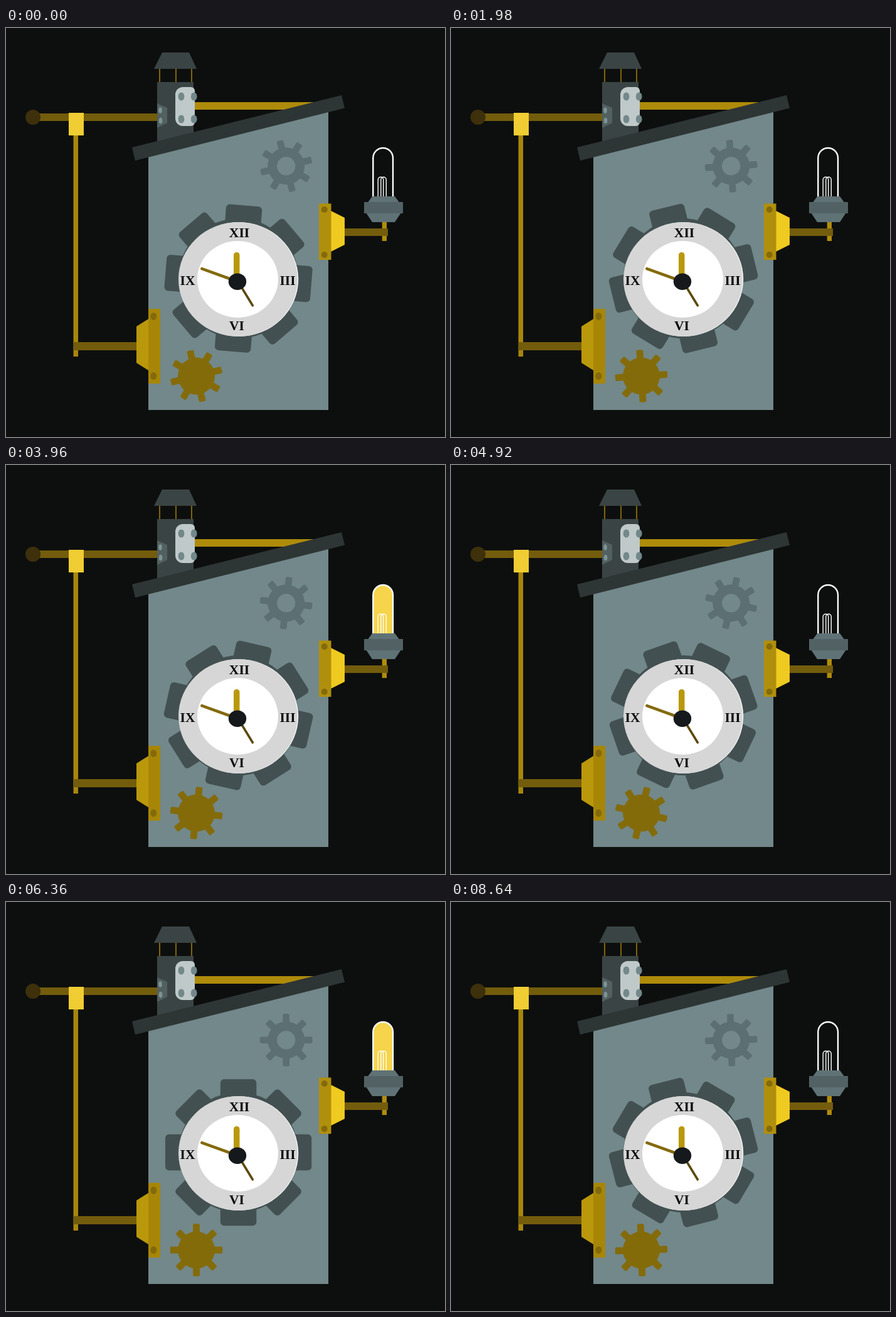
An HTML page with a canvas that plays this animation: 700 px wide and 651 px high, repeating every 8.7 s.

```html
<!DOCTYPE html>
<html lang="en">
<head>
<meta charset="utf-8">
<title>Clock machine</title>
<style>
html, body { margin: 0; width: 100%; height: 100%; overflow: hidden; background: #0d0f0f; }
canvas { display: block; }
</style>
</head>
<body>
<canvas id="stage" width="700" height="651"></canvas>
<script>
const ctx = document.getElementById('stage').getContext('2d');
const LOOP = 8700;
const WALL = '#72888a', GOLD = '#ae8b0a', BROWN = '#735c0c', BOLT = '#836a0c';

function rect(x1, y1, x2, y2, color) {
  ctx.fillStyle = color;
  ctx.fillRect(x1, y1, x2 - x1, y2 - y1);
}

function round(x, y, w, h, r, color) {
  ctx.fillStyle = color;
  ctx.beginPath();
  ctx.roundRect(x, y, w, h, r);
  ctx.fill();
}

function poly(color, ...p) {
  ctx.fillStyle = color;
  ctx.beginPath();
  for (let i = 0; i < p.length; i += 2) ctx.lineTo(p[i], p[i + 1]);
  ctx.fill();
}

function oval(x, y, rx, ry, color) {
  ctx.fillStyle = color;
  ctx.beginPath();
  ctx.ellipse(x, y, rx, ry, 0, 0, Math.PI * 2);
  ctx.fill();
}

function line(x1, y1, x2, y2, width, color) {
  ctx.strokeStyle = color;
  ctx.lineWidth = width;
  ctx.lineCap = 'round';
  ctx.beginPath();
  ctx.moveTo(x1, y1);
  ctx.lineTo(x2, y2);
  ctx.stroke();
}

function gear(x, y, deg, body, outer, tooth, corner, color) {
  ctx.save();
  ctx.translate(x, y);
  oval(0, 0, body, body, color);
  ctx.rotate(deg * Math.PI / 180);
  for (let i = 0; i < 8; i++) {
    round(-tooth / 2, -outer, tooth, outer * 0.6, corner, color);
    ctx.rotate(Math.PI / 4);
  }
  ctx.restore();
}

function arch(x1, x2, top, bottom) {
  const r = (x2 - x1) / 2;
  ctx.beginPath();
  ctx.moveTo(x1, bottom);
  ctx.arc(x1 + r, top + r, r, Math.PI, 0);
  ctx.lineTo(x2, bottom);
}

const ramp = (t, a, b) => Math.min(1, Math.max(0, (t - a) / (b - a)));

// Lamp brightness: flash, slow glow, flash
function glow(t) {
  const pulse = (a, b, fade) => Math.min(ramp(t, a, a + fade), 1 - ramp(t, b - fade, b));
  return Math.max(pulse(840, 1740, 60), pulse(3300, 4700, 600), pulse(6260, 7160, 60));
}

function tower() {
  rect(50, 136, 242, 148, BROWN);
  oval(43, 142, 12, 12, '#3d300a');
  rect(301, 118, 495, 130, GOLD);
  for (const x of [245, 271, 296]) rect(x - 1, 64, x + 1, 87, '#806508');
  poly('#3b4444', 249, 39, 292, 39, 304, 65, 236, 65);
  rect(241, 86, 299, 190, '#3b4444');
  poly('#526060', 241, 120, 257, 127, 257, 151, 241, 159);
  oval(246, 131, 2.8, 4.8, '#7b9496');
  oval(246.5, 147.5, 2.8, 4.8, '#7b9496');
  round(270, 94, 31, 62, [12, 6, 6, 12], '#bfc9c9');
  for (const x of [279.5, 299.7])
    for (const y of [109, 145]) oval(x, y, 4.9, 6.6, WALL);
}

function house() {
  poly(WALL, 227, 200, 514, 125, 514, 608, 227, 608);
  poly('#2e3535', 201, 190, 535, 107, 540, 127.5, 206, 211);
}

function leftPipes() {
  rect(107.5, 170, 115, 523, '#a8860c');
  rect(107.5, 500, 208, 513, BROWN);
  rect(100, 135, 124, 171, '#efcd33');
  poly('#ba980b', 208, 475, 228, 462.5, 228, 545.5, 208, 533);
  rect(227, 447, 246, 566, '#a78607');
  oval(235.3, 459, 5, 6, BOLT);
  oval(235.3, 554, 5, 6, BOLT);
}

function lamp(level) {
  poly('#efca20', 518, 291, 540, 302, 540, 345, 518, 356);
  rect(499, 279.5, 518.5, 369, '#b08f0d');
  oval(507.7, 289, 5, 5, BOLT);
  oval(507.7, 361, 5, 5, BOLT);
  rect(599.7, 308, 607, 339, '#b08c0c');
  rect(540, 319, 609, 331, BROWN);

  arch(585.3, 617, 191, 268);
  ctx.globalAlpha = level;
  ctx.fillStyle = '#f6d44c';
  ctx.fill();
  ctx.globalAlpha = 1;
  ctx.lineCap = 'butt';
  ctx.strokeStyle = '#fff';
  ctx.lineWidth = 2.4;
  ctx.stroke();
  ctx.lineWidth = 1.4;
  for (const x of [593.2, 597.8]) {
    arch(x, x + 8.5, 237.2, 268);
    ctx.stroke();
  }

  poly('#5f7275', 584, 268, 620, 268, 627, 277.5, 577, 277.5);
  poly('#5f7275', 574, 294, 630, 294, 620, 309, 584, 309);
  rect(571, 277, 633, 295, '#526264');
}

function dial() {
  oval(371.2, 400, 95, 91, '#fff');
  oval(370, 400, 95, 91, '#d6d6d6');
  oval(369.5, 400, 64.5, 61, '#fff');
  ctx.fillStyle = '#060808';
  ctx.font = 'bold 21.5px "Liberation Serif", "Times New Roman", serif';
  ctx.textAlign = 'center';
  ctx.fillText('XII', 372, 333);
  ctx.fillText('III', 449, 408.5);
  ctx.fillText('VI', 368, 481);
  ctx.fillText('IX', 289.5, 408.5);
  round(363, 357, 9.5, 46, 4.5, '#ba980b');
  line(312.3, 383.2, 369, 403.5, 4.6, BOLT);
  line(369, 402, 393.3, 441.8, 3.6, '#5b4909');
  oval(369, 403.7, 14.2, 13.3, '#16191c');
}

function draw(t) {
  const turn = 13.42 * (t + 346) / 1000;
  rect(0, 0, 700, 651, '#0d0f0f');
  tower();
  house();
  leftPipes();
  gear(446.7, 219.8, -3 * turn, 29.5, 41.7, 10.6, 2, '#5c6f72');
  oval(446.7, 219.8, 14.7, 14.7, WALL);
  gear(303.5, 554, -3 * turn, 29.5, 41.7, 10.8, 2, '#846b0a');
  gear(370.6, 398.6, turn, 95.5, 116.6, 57.5, 6, '#435051');
  dial();
  lamp(glow(t));
}

const start = performance.now();
function tick() {
  draw((performance.now() - start) % LOOP);
  requestAnimationFrame(tick);
}
tick();
</script>
</body>
</html>
```
